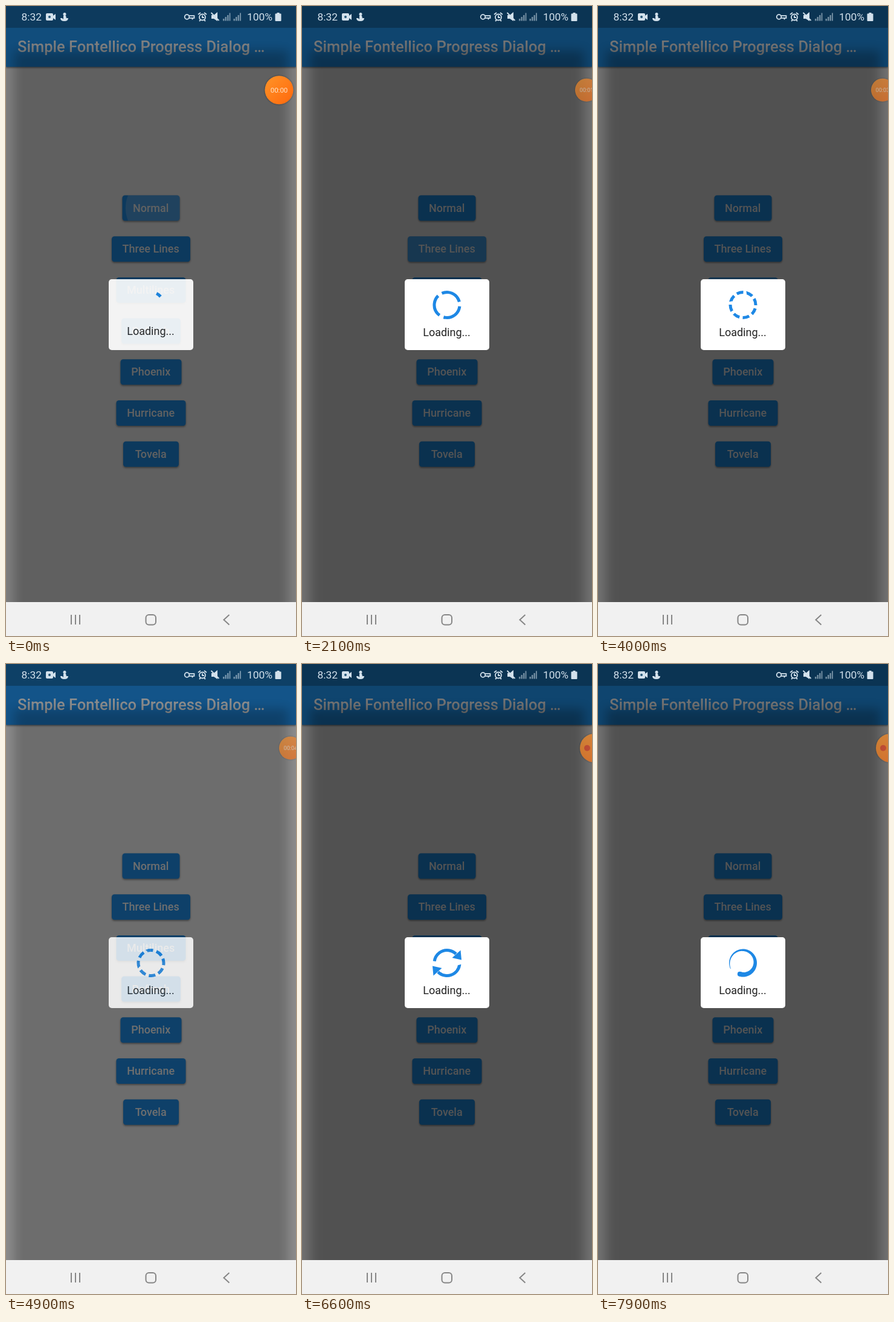
An HTML page that plays this animation: 480x1040 px, repeating every 8000 ms.

```html
<!DOCTYPE html>
<html lang="en">
<head>
<meta charset="utf-8">
<title>Progress dialogs</title>
<style>
  html, body { margin: 0; width: 480px; height: 1040px; overflow: hidden; background: #fafafa; }
  svg { display: block; }
  text { font-family: Roboto, Arial, sans-serif; }
  .mid { text-anchor: middle; }
  .bold { font-weight: 500; fill: #fff; }
  .line { fill: none; stroke: currentColor; }
</style>
</head>
<body>
<svg width="480" height="1040" viewBox="0 0 480 1040">
  <defs>
    <filter id="soft" x="-20%" y="-50%" width="140%" height="220%"><feGaussianBlur stdDeviation="1.6"/></filter>
    <filter id="wide" filterUnits="userSpaceOnUse" x="-40" y="0" width="560" height="1080"><feGaussianBlur stdDeviation="9"/></filter>
    <linearGradient id="orange" x2="1" y2="1"><stop stop-color="#ff9428"/><stop offset="1" stop-color="#ff680c"/></linearGradient>
    <clipPath id="app"><rect width="480" height="984"/></clipPath>
    <clipPath id="pressed"><rect id="pressBox" height="42" rx="4.5"/></clipPath>
  </defs>

  <rect width="480" height="1040" fill="#fafafa"/>
  <rect y="38" width="480" height="64" opacity=".45" filter="url(#soft)"/>
  <rect width="480" height="100.5" fill="#2196f3"/>
  <rect width="480" height="36" fill="#1971b6"/>
  <text class="bold" x="19" y="76" font-size="25.5">Simple Fontellico Progress Dialog …</text>
  <g id="buttons"></g>
  <circle id="ripple" cx="252" fill="#fff" clip-path="url(#pressed)"/>

  <g clip-path="url(#app)">
    <rect id="barrier" width="480" height="984"/>
    <g id="dialog">
      <rect x="13" y="74" width="454" height="960" opacity=".28" filter="url(#wide)"/>
      <rect x="170" y="451" width="140" height="117" rx="5" fill="#fff"/>
      <g id="spinner" fill="#1e88e5" stroke="#1e88e5" stroke-width="0"></g>
      <text id="loading" class="mid" x="239.5" font-size="18" fill="#222">Loading...</text>
    </g>
  </g>

  <!-- status bar -->
  <g fill="#d3e1ec" color="#d3e1ec" font-size="17.4">
    <text x="25.5" y="24">8:32</text>
    <path d="M68 12h8q2 0 2 2v2l4-3v10l-4-3v2q0 2-2 2h-8q-2 0-2-2v-8q0-2 2-2z"/>
    <circle cx="72" cy="18" r="2" fill="#245577"/>
    <circle cx="97" cy="13.5" r="2.5"/>
    <path d="M95 16h4l1 4h3q0 5-6.500 5t-6.500-5h3l2 2z"/>
    <g class="line" stroke-width="1.8">
      <circle cx="299.5" cy="18" r="3.8"/><path d="M303 16.200h8.500v3.600h-8.500M308.500 20v2.500"/>
      <circle cx="325" cy="18.500" r="5"/><path d="M325 15.500v3.500h3M318 14l4-3M332 14l-4-3M320 25l2-2M330 25l-2-2"/>
    </g>
    <path d="M340 15h4l6-5v15l-6-4h-4z"/>
    <path class="line" d="M339.500 11l13 13" stroke-width="1.8"/>
    <path id="bars" d="M359 21h2.500v3.500h-2.500zM362.500 18h2.500v6.500h-2.500zM366 15h2.500v9.500h-2.500zM369.500 11.500h2v13h-2z" opacity=".5"/>
    <use href="#bars" x="17.5"/>
    <text x="399" y="24">100%</text>
    <path d="M448.500 11h4v1.500h2q1 0 1 1v10.500q0 1-1 1h-8q-1 0-1-1v-10.500q0-1 1-1h2z"/>
  </g>

  <!-- floating recorder button -->
  <g id="recorder">
    <circle r="25.5" opacity=".1"/>
    <circle r="23.5" fill="url(#orange)"/>
    <text id="clock" class="mid" y="4" font-size="11.5" fill="#ffe6cc"></text>
    <circle id="dot" cx="-11.5" r="5" fill="#e0401f"/>
  </g>

  <!-- navigation bar -->
  <rect y="984" width="480" height="56" fill="#f1f1f1"/>
  <g class="line" color="#868686" stroke-width="2">
    <path d="M108 1005v16M115 1005v16M122 1005v16M369.500 1005l-9 8.200 9 8.200"/>
    <rect x="231.5" y="1005" width="16.5" height="16.5" rx="5"/>
  </g>
</svg>
<script>
const $ = id => document.getElementById(id);
const set = (el, attrs) => { for (const k in attrs) el.setAttribute(k, attrs[k]); };
const clamp = x => Math.max(0, Math.min(1, x));
const ramp = (t, from, to) => clamp((t - from) / (to - from));
const ease = x => 1 - (1 - x) ** 1.75;
const CX = 240, CY = 493.5;

const buttons = [['Normal', 95], ['Three Lines', 130], ['Multilines', 115], ['Refresh', 98],
  ['Phoenix', 101], ['Hurricane', 115], ['Tovela', 92]];
const buttonY = i => 312.5 + i * 67.7;

$('buttons').innerHTML = buttons.map(([label, w], i) => {
  const box = dy => `x="${CX - w / 2}" y="${buttonY(i) + dy}" width="${w}" height="42" rx="4.5"`;
  return `<rect ${box(1.8)} opacity=".4" filter="url(#soft)"/><rect ${box(0)} fill="#2196f3"/>
    <text class="bold mid" x="239.7" y="${buttonY(i) + 27}" font-size="18">${label}</text>`;
}).join('');

const ring = (dash, turn) => `<circle r="21" fill="none" stroke-width="5" pathLength="360"
  stroke-dasharray="${dash}" transform="rotate(${turn})"/>`;

// Ring that thickens clockwise towards a round end
function comet() {
  const at = (u, r) => {
    const a = (155 + 311 * u) * Math.PI / 180;
    return [r * Math.cos(a), r * Math.sin(a)].map(v => v.toFixed(2));
  };
  const steps = [...Array(61)].map((_, i) => i / 60);
  const outer = steps.map(u => at(u, 23));
  const inner = steps.map(u => at(u, 22.3 - 7.3 * u)).reverse();
  const [x, y] = at(1, 19);
  return `<path d="M${[...outer, ...inner].join('L')}z"/><circle cx="${x}" cy="${y}" r="4"/>`;
}

const arrow = 'M22.500 -21L24 -5L8.500 -8.500z';
// Dialogs: open and close times, icon, and the time at which the icon stands as drawn
const dialogs = [
  { open: -112, close: 805 },
  { open: 1950, close: 2900, icon: ring('100 20', 6), rest: 2100 },
  { open: 3830, close: 4843, icon: ring('30 15', -20), rest: 4900 },
  { open: 5720, close: 6700, icon: ring('127 53', 188) +
      `<path d="${arrow}"/><path d="${arrow}" transform="rotate(180)"/>`, rest: 6600 },
  { open: 7200, close: 8300, icon: comet(), rest: 7900 }
];

// Material indeterminate arc
function materialArc(ms) {
  const path = ms / 1333 % 1;
  const curve = x => { // cubic-bezier(.4, 0, .2, 1)
    let lo = 0, hi = 1, s;
    for (let i = 0; i < 20; i++) {
      s = (lo + hi) / 2;
      if (1.2 * s * (1 - s) ** 2 + .6 * s * s * (1 - s) + s ** 3 < x) lo = s; else hi = s;
    }
    return 3 * s * s * (1 - s) + s ** 3;
  };
  const head = curve(clamp(path * 2)), tail = curve(clamp(path * 2 - 1));
  const sweep = Math.max((head - tail) * 270, .1);
  return ring(`${sweep} ${360 - sweep}`, -90 + tail * 270 + ms / 2222 * 360 + path * 90);
}

let shown = -1;
function drawDialog(t) {
  const i = dialogs.findLastIndex(d => t >= d.open - 150), d = dialogs[i];
  const since = t - d.open;
  const level = ease(Math.min(ramp(t, d.open, d.open + 150), 1 - ramp(t, d.close, d.close + 150)));
  set($('barrier'), { opacity: .54 * level });
  set($('dialog'), { opacity: level });
  set($('loading'), { y: d.icon ? 544.5 : 542.8 });

  if (!d.icon) $('spinner').innerHTML = materialArc(112 + t * 1.1);
  else if (shown !== i) $('spinner').innerHTML = d.icon;
  shown = i;
  const turn = d.icon ? (t - d.rest) * .36 : 0;
  set($('spinner'), { transform: `translate(${CX} ${CY}) rotate(${turn})` });

  const w = buttons[i][1];
  set($('pressBox'), { x: CX - w / 2, y: buttonY(i), width: w });
  set($('ripple'), {
    cy: buttonY(i) + 21,
    r: w * Math.max(0, .57 + (since - 112) / 330),
    opacity: .24 * (1 - ramp(since, 100, 300))
  });
}

function drawRecorder(t) {
  const shrink = ramp(t, 1400, 1700), hide = ramp(t, 4950, 5200);
  const x = 452 + 19 * shrink + 12.5 * hide;
  const scale = 1 - .19 * shrink + .19 * hide;
  set($('recorder'), {
    transform: `translate(${x} 138.7) scale(${scale})`,
    opacity: 1 - .38 * shrink + .08 * hide
  });
  $('clock').textContent = '00:0' + Math.floor(Math.max(0, t - 400) / 1000);
  set($('clock'), { opacity: 1 - hide });
  set($('dot'), { opacity: hide });
}

function frame() {
  const t = Math.floor(performance.now() % 8000 / 100) * 100; // ten pictures a second
  drawDialog(t);
  drawRecorder(t);
  requestAnimationFrame(frame);
}
frame();
</script>
</body>
</html>
```
